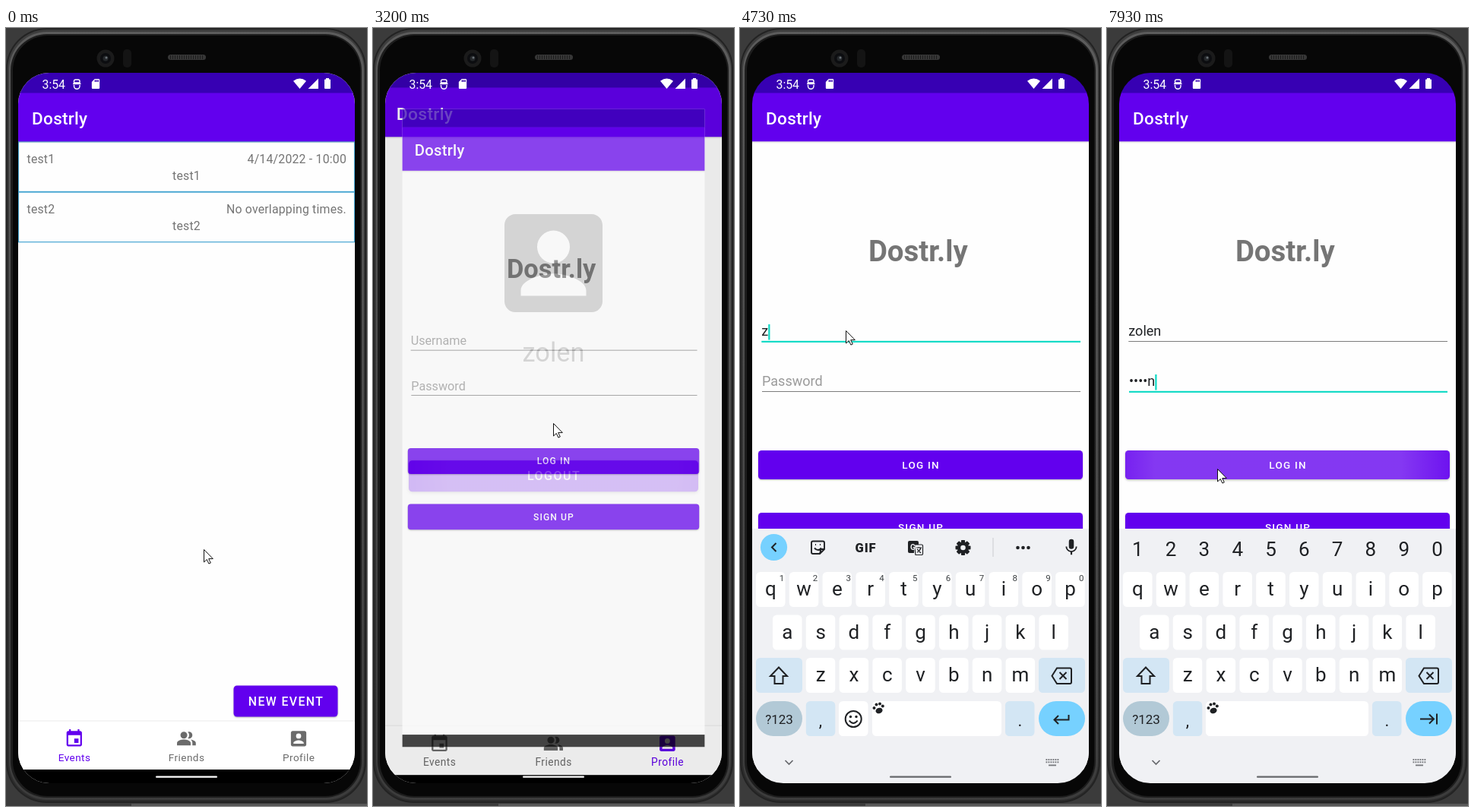
Recreate the animation shown at these times as an HTML page with a canvas. Size 475 px wide and 1024 px high, loop 8000 ms.

```html
<!DOCTYPE html>
<html lang="en">
<head>
<meta charset="utf-8">
<title>Phone demo</title>
<style>
html, body { margin: 0; width: 100%; height: 100%; overflow: hidden; background: #3b3b3b; }
canvas { display: block; width: 475px; height: 1024px; }
</style>
</head>
<body>
<canvas id="stage"></canvas>
<script>
const W = 475, H = 1024, LOOP = 8000, STEP = 120;
const APP = 'Dostrly', BRAND = 'Dostr.ly', USER = 'zolen';
const VIOLET = '#6200ee', GREY = '#757575', TEAL = '#0bd9c4', INK = '#1f2124', SKY = '#76d1ff';
const dpr = window.devicePixelRatio || 1;

function makeCanvas(el) {
  el.width = W * dpr;
  el.height = H * dpr;
  const c = el.getContext('2d');
  c.scale(dpr, dpr);
  return c;
}
const main = makeCanvas(document.getElementById('stage'));
const layer = makeCanvas(document.createElement('canvas'));
let g = main;

// Screen updates: [start, count], spaced STEP apart
const RUNS = [[0, 1], [670, 1], [1040, 5], [1670, 1], [2040, 2], [2310, 2], [2670, 2], [2940, 1],
  [3080, 5], [3710, 3], [4100, 1], [4250, 6], [5090, 1], [5330, 4], [5830, 2], [6190, 2],
  [6560, 2], [7210, 7]];
const TICKS = RUNS.flatMap(([s, n]) => Array.from({ length: n }, (_, i) => s + i * STEP));

const POINTER = [[0, 260, 686], [670, 262, 686], [1040, 240, 680], [1160, 203, 692], [1280, 200, 770],
  [1400, 275, 885], [1520, 366, 953], [1670, 384, 944], [2160, 384, 944], [2310, 330, 770],
  [2430, 262, 555], [2670, 253, 574], [2790, 249, 580], [3080, 249, 580], [3200, 237, 520],
  [3320, 205, 420], [3440, 175, 358], [3560, 150, 385], [3710, 141, 412], [3950, 139, 421],
  [4100, 139, 398], [6680, 139, 398], [7210, 140, 425], [7330, 145, 500], [7450, 148, 560],
  [7690, 145, 580]];
const KEYBOARD = [[4130, 0], [4250, .06], [4370, .446], [4490, .82], [4610, .96], [4730, 1]];
const TAB_RIPPLE = [[2040, 18], [2160, 38], [2430, 65], [2670, 80]];
const USER_TYPED = [[4730, 1], [4850, 2], [5330, 3], [5450, 4], [5690, 5]];
const PASS_TYPED = [[6190, 1], [6310, 2], [6560, 4], [6680, 5]];

const clamp = v => Math.max(0, Math.min(1, v));

function track(keys, t, k = 1) {
  const i = keys.findIndex(p => p[0] > t);
  if (i < 0) return keys[keys.length - 1][k];
  if (i === 0) return keys[0][k];
  const a = keys[i - 1], b = keys[i];
  return a[k] + (b[k] - a[k]) * (t - a[0]) / (b[0] - a[0]);
}
const typed = (keys, t) => keys.reduce((n, k) => t >= k[0] ? k[1] : n, 0);

const ICONS = {
  event: 'M17 12h-5v5h5zM16 1v2H8V1H6v2H5c-1.1 0-2 .9-2 2v14c0 1.1.9 2 2 2h14c1.1 0 2-.9 2-2V5c0-1.1-.9-2-2-2h-1V1zm3 18H5V8h14z',
  people: 'M16.7 13.1C18 14 19 15.3 19 17v3h4v-3c0-2.2-3.6-3.5-6.3-3.9zM15 12a4 4 0 0 0 0-8c-.5 0-.9.1-1.3.2a6 6 0 0 1 0 7.6c.4.1.8.2 1.3.2zM9 12a4 4 0 1 0 0-8 4 4 0 0 0 0 8zm0 1c-2.7 0-8 1.3-8 4v3h16v-3c0-2.7-5.3-4-8-4z',
  account: 'M3 5v14c0 1.1.9 2 2 2h14c1.1 0 2-.9 2-2V5c0-1.1-.9-2-2-2H5c-1.1 0-2 .9-2 2zm12 4a3 3 0 1 1-6 0 3 3 0 0 1 6 0zm-9 8c0-2 4-3.1 6-3.1s6 1.1 6 3.1v1H6z',
  mic: 'M12 14a3 3 0 0 0 3-3V5a3 3 0 0 0-6 0v6a3 3 0 0 0 3 3zm5.3-3a5.3 5.3 0 0 1-10.6 0H5a7 7 0 0 0 6 6.7V21h2v-3.3A7 7 0 0 0 19 11z',
  wifi: 'M0 4Q12-5 24 4L12 18.5z',
  sd: 'M18 2h-8L4 8v12c0 1.1.9 2 2 2h12c1.1 0 2-.9 2-2V4c0-1.1-.9-2-2-2zm-6 6h-2V4h2zm3 0h-2V4h2zm3 0h-2V4h2z',
  arrow: 'M0 0V16.5L3.8 13 6.4 18.6 8.8 17.5 6.2 12.1H11.8Z'
};
for (const k in ICONS) ICONS[k] = new Path2D(ICONS[k]);

function at(x, y, s, fn) {
  g.save();
  g.translate(x, y);
  g.scale(s, s);
  fn();
  g.restore();
}
function icon(name, cx, cy, size, color) {
  const s = size / 24;
  at(cx - size / 2, cy - size / 2, s, () => { g.fillStyle = color; g.fill(ICONS[name]); });
}
function rect(x, y, w, h, color) { g.fillStyle = color; g.fillRect(x, y, w, h); }
function pill(x, y, w, h, r, color) {
  g.fillStyle = color;
  g.beginPath();
  g.roundRect(x, y, w, h, r);
  g.fill();
}
function disc(x, y, r, color) {
  g.fillStyle = color;
  g.beginPath();
  g.arc(x, y, r, 0, 7);
  g.fill();
}
function line(d, color, width = 2) {
  g.strokeStyle = color;
  g.lineWidth = width;
  g.stroke(new Path2D(d));
}
function text(s, x, y, size, color, weight = 400, align = 'left', spacing = 0) {
  g.font = `${weight} ${size}px Roboto, sans-serif`;
  g.letterSpacing = spacing + 'px';
  g.textAlign = align;
  g.fillStyle = color;
  g.fillText(s, x, y);
  return g.measureText(s).width;
}
function group(alpha, dy, fn) {
  layer.clearRect(0, 0, W, H);
  g = layer;
  fn();
  g = main;
  g.save();
  g.globalAlpha = alpha;
  g.drawImage(layer.canvas, 0, dy, W, H);
  g.restore();
}
function shade(y0, y1, a, b) {
  const gr = g.createLinearGradient(0, y0, 0, y1);
  gr.addColorStop(0, a);
  gr.addColorStop(1, b);
  return gr;
}

function phone() {
  rect(0, 0, W, H, '#3b3b3b');
  rect(165, 1021, 310, 3, '#585858');
  pill(0, 0, 474, 1020, 54, '#232323');
  pill(2, 2, 470, 1016, 52, shade(0, 1020, '#3e3e3e', '#2c2c2c'));
  pill(4, 5, 467, 1011, 50, shade(0, 1020, '#5c5c5c', '#3c3c3c'));
  pill(6, 8, 462, 1005, 48, '#1d1d1d');
  pill(9, 10, 457, 1001, 46, '#070707');
  disc(131, 40, 11.5, '#1b1b1b');
  disc(131, 40, 7, '#0c0d10');
  disc(131, 40, 3.5, '#25282b');
  disc(132, 39, 1.5, '#697076');
  pill(154, 28, 11, 24, 5, '#141414');
  pill(213, 35, 50, 7, 3.5, '#373737');
  for (let x = 216; x < 261; x += 3) rect(x, 36, 1, 5, '#1c1c1c');
}

function statusIcons() {
  text('3:54', 47.5, 79.7, 15.8, '#fff');
  line('M89.500 72V70a2 2 0 0 1 2-2H95a2 2 0 0 1 2 2V72ZM88 73.500H98.500M89.500 75V76.500a3.700 3.700 0 0 0 7.500 0V75', '#fff', 1.4);
  icon('sd', 118, 73.5, 15.5, '#fff');
  at(378, 66.9, .71, () => { g.fillStyle = '#fff'; g.fill(ICONS.wifi); });
  g.fillStyle = '#fff';
  g.fill(new Path2D('M411 66.5V80H397.5Z'));
  pill(419, 67.5, 8, 12.5, 1, '#fff');
  rect(421, 66, 4, 2, '#fff');
}

// One app window with status bar, toolbar and system bar
function appWindow(content) {
  rect(16, 59, 443, 935, '#fefefe');
  content();
  rect(16, 149, 443, 3, shade(149, 152, 'rgba(0,0,0,.16)', 'rgba(0,0,0,0)'));
  rect(16, 85, 443, 64.3, VIOLET);
  rect(16, 59, 443, 26.5, '#3700b3');
  text(APP, 34, 127, 22.56, '#fff', 500, 'left', .28);
  rect(16, 976, 443, 18, '#000');
}

function button(x, y, w, h, label, size, lift = 0, ripple) {
  g.save();
  g.shadowColor = 'rgba(0,0,0,.28)';
  g.shadowBlur = (2 + lift) * dpr;
  g.shadowOffsetY = (1 + lift / 4) * dpr;
  pill(x, y, w, h, 4.5, VIOLET);
  g.restore();
  if (ripple) {
    const { x: rx, y: ry, r, a } = ripple;
    const gr = g.createRadialGradient(rx, ry, r * .72, rx, ry, r * 1.15);
    gr.addColorStop(0, `rgba(255,255,255,${a})`);
    gr.addColorStop(1, 'rgba(255,255,255,0)');
    pill(x, y, w, h, 4.5, gr);
  }
  text(label, x + w / 2 + .5, y + h / 2 + size * .355, size, '#fff', 500, 'center', size * .0893);
}

function bottomNav(mix, t) {
  rect(16, 912, 443, 64, '#fff');
  rect(16, 911.5, 443, 1, '#ececec');
  if (t >= 2040 && t < 2790) {
    g.save();
    g.beginPath();
    g.rect(305, 912, 154, 64);
    g.clip();
    disc(385, 944, track(TAB_RIPPLE, t), '#f2f2f2');
    g.restore();
  }
  const blend = m => `color-mix(in srgb, ${VIOLET} ${m * 100}%, #6b6b6b)`;
  [['event', 'Events', 1 - mix], ['people', 'Friends', 0], ['account', 'Profile', mix]].forEach(([ic, label, m], i) => {
    const x = 89.8 + i * 147.6;
    icon(ic, x, 935.3, 27, blend(m));
    text(label, x + .2, 964.5, 13.5, blend(m), 400, 'center', .45);
  });
}

function eventRow(y, name, when) {
  g.strokeStyle = '#45a5d2';
  g.lineWidth = 1.2;
  g.strokeRect(16.5, y, 442, 65.6);
  text(name, 27.5, y + 28.3, 15.8, GREY, 400, 'left', .22);
  text(when, 448, y + 28.3, 15.8, GREY, 400, 'right', .22);
  text(name, 237.5, y + 50.2, 15.8, GREY, 400, 'center', .22);
}

function events(t) {
  eventRow(149.8, 'test1', '4/14/2022 - 10:00');
  eventRow(216.1, 'test2', 'No overlapping times.');
  button(299.5, 865.5, 137, 41, 'NEW EVENT', 15.8);
  bottomNav(0, t);
}

function profile(t) {
  icon('account', 237.5, 313, 169.3, GREY);
  text(USER, 237.5, 440, 33.84, GREY, 400, 'center');
  const press = t >= 2940 && { x: 249, y: 580, r: t < 3080 ? 60 : 200, a: .16 };
  button(50, 568.5, 375, 40.5, 'LOGOUT', 15.8, press ? 2 : 0, press);
  bottomNav(t < 2310 ? .5 : 1, t);
}

function field(x, base, hint, value, focus, caret) {
  const w = value ? text(value, x, base, 18.05, INK) : (text(hint, x, base, 18.05, '#9b9b9b'), 0);
  if (focus) rect(x, base + 6.8, 448 - x, 2.1, TEAL);
  else rect(x, base + 7, 448 - x, 1, '#7d7d7d');
  if (caret) rect(x + w, base - 15, 2.2, 20.5, TEAL);
}

function login(t) {
  text(BRAND, 234.3, 307, 38.4, GREY, 700, 'center');
  const inPass = t >= 5950, n = typed(PASS_TYPED, t);
  const pass = n ? '•'.repeat(n - 1) + USER[n - 1] : '';
  const inUser = t >= 4250 && !inPass;
  field(28.3, 405, 'Username', USER.slice(0, typed(USER_TYPED, t)), inUser, inUser && t !== 5090);
  field(29, 471, 'Password', pass, inPass, inPass);
  // the ripple drifts to the button centre while it grows
  const press = t >= 7810 && (t < 7930 ? { x: 185, y: 578, r: 130, a: .2 } : { x: 225, y: 576, r: 225, a: .22 });
  button(24, 556, 427, 38, 'LOG IN', 13.5, press ? 1 : 0, press);
  button(24, 638, 427, 37.5, 'SIGN UP', 13.5);
}

function toolbarIcons() {
  disc(44.5, 683.5, 17.6, SKY);
  line('M47.5 678l-5.5 5.5 5.5 5.5', INK);
  line('M96 675.5H109a2 2 0 0 1 2 2V686l-6 6H96a2 2 0 0 1-2-2V677.5a2 2 0 0 1 2-2ZM98 684.5q4.500 5 9 0M111 686h-4.500l-1.500 6M99 680h1M105 680h1', INK, 1.9);
  text('GIF', 165.5, 689.7, 16.5, INK, 900, 'center', .9);
  pill(221, 675, 14, 16, 2, INK);
  pill(229, 680, 12, 14, 1.5, '#f0f1f4');
  line('M229.500 680H239a1.500 1.500 0 0 1 1.500 1.500V692a1.500 1.500 0 0 1-1.500 1.500H231ZM232 684h7M235.500 683v1.500M238 684q-1 4-5 6M233 686l5 5', INK, 1.2);
  text('G', 227.5, 687, 10, '#f0f1f4', 700, 'center');
  for (let i = 0; i < 8; i++) {
    g.save();
    g.translate(293.5, 684);
    g.rotate(i * Math.PI / 4);
    pill(-2.6, -10, 5.2, 7, 1, INK);
    g.restore();
  }
  disc(293.5, 684, 7.6, INK);
  disc(293.5, 684, 3.3, '#f0f1f4');
  rect(332.5, 671, 1, 25, '#c9cbd0');
  [365.5, 372.5, 379.5].forEach(x => disc(x, 684, 2.3, INK));
  icon('mic', 436, 683.5, 26, INK);
}

function paw(x) {
  g.fillStyle = INK;
  g.beginPath();
  g.ellipse(x + 1, 898.5, 4.6, 3.6, -.3, 0, 7);
  g.fill();
  [[-5.5, 895], [-2.5, 890.5], [2, 889.5], [5.8, 892.5]].forEach(([dx, y]) => disc(x + dx, y, 2, INK));
}

function keyboard(digits) {
  const pitch = 43.8, top = [716, 772.5, 829, 886];
  const key = (x, y, w, color = '#fff', r = 5.5) => pill(x, y, w, 46, r, color);
  const row = (chars, x, y) => [...chars].forEach((c, i) => {
    key(x + i * pitch, y, 38.5);
    text(c, x + 19.3 + i * pitch, y + 31, 26, INK, 400, 'center');
  });
  rect(16, 659, 443, 345, '#f0f1f4');
  row('qwertyuiop', 21, top[0]);
  row('asdfghjkl', 43, top[1]);
  row('zxcvbnm', 86.8, top[2]);
  [...'1234567890'].forEach((d, i) => {
    const x = 40.3 + i * pitch;
    if (digits) text(d, x, 694.5, 26, INK, 400, 'center');
    else text(d, x + 14.8, 728, 11.5, '#3c4043', 400, 'center');
  });
  if (!digits) toolbarIcons();

  const pale = '#d3e6f4';
  key(21, top[2], 61, pale);
  key(393, top[2], 61, pale);
  line('M51 841.500L62 853H56.500V863H45.500V853H40Z', INK);
  line('M417 842.500H434a2 2 0 0 1 2 2V861a2 2 0 0 1-2 2H417L410.500 852.700ZM420.500 848l9 9M429.500 848l-9 9', INK);

  key(21, top[3], 61, '#b2c9d6', 23);
  text('?123', 51.5, 916, 17, INK, 400, 'center');
  key(86.8, top[3], 38.5, pale);
  text(',', 106, 919, 22, INK, 400, 'center');
  key(349, top[3], 38.5, pale);
  text('.', 368.3, 919, 22, INK, 400, 'center');
  key(393, top[3], 61, SKY, 23);
  if (digits) {
    key(130, top[3], 214);
    paw(139);
    line('M412 909.500H430M424 903.500l6 6-6 6M434 902.500V916.500', INK);
  } else {
    key(130, top[3], 38.5);
    key(174, top[3], 170);
    paw(182);
    line('M138.700 909.500a10.500 10.500 0 1 0 21 0a10.500 10.500 0 1 0-21 0M143.700 911.500q5.500 7 11 0', INK);
    disc(145.5, 906.5, 1.7, INK);
    disc(153, 906.5, 1.7, INK);
    line('M432.500 904V910.500H413.500M419 905l-5.500 5.500 5.500 5.500', INK);
  }
  line('M59.500 964l5 5 5-5', '#66686c', 1.7);
  for (let i = 0; i < 12; i++) rect(402.5 + i % 6 * 3, 962 + (i / 6 | 0) * 3.3, 1.8, 2, '#77797d');
  rect(406, 969.5, 10, 1.8, '#77797d');
}

function scaled(s, fn) {
  g.save();
  g.translate(237.5, 526.5);
  g.scale(s, s);
  g.translate(-237.5, -526.5);
  fn();
  g.restore();
}

function draw(t) {
  g = main;
  phone();
  g.save();
  g.beginPath();
  g.roundRect(16, 59, 443, 935, 41);
  g.clip();

  const open = t < 3150 ? 0 : t >= 3950 ? 1 : 1 - Math.exp((3150 - t) / 130);
  if (open < 1) {
    const page = t < 2160 ? events : profile;
    scaled(1 + .05 * open, () => appWindow(() => page(t)));
    rect(16, 59, 443, 935, `rgba(0,0,0,${.25 * open})`);
  }
  if (open > 0) {
    group(clamp((t - 3150) / 70), 0, () => scaled(.85 + .15 * open, () => appWindow(() => login(t))));
  }
  const up = track(KEYBOARD, t);
  if (up > 0) group(up ** 1.3, 335 * (1 - up), () => keyboard(t >= 5950));
  statusIcons();
  pill(197, 984.5, 81, 2.3, 1.1, up > .9 ? '#66686b' : '#fff');
  g.restore();

  at(track(POINTER, t, 1) + .5, track(POINTER, t, 2) + .5, 1, () => {
    g.fillStyle = '#fff';
    g.fill(ICONS.arrow);
    g.strokeStyle = '#111';
    g.lineWidth = 1;
    g.stroke(ICONS.arrow);
  });
}

const start = performance.now();
function frame() {
  const now = Math.max(0, performance.now() - start) % LOOP;
  draw(TICKS.filter(k => k <= now).pop());
  requestAnimationFrame(frame);
}
frame();
</script>
</body>
</html>
```
